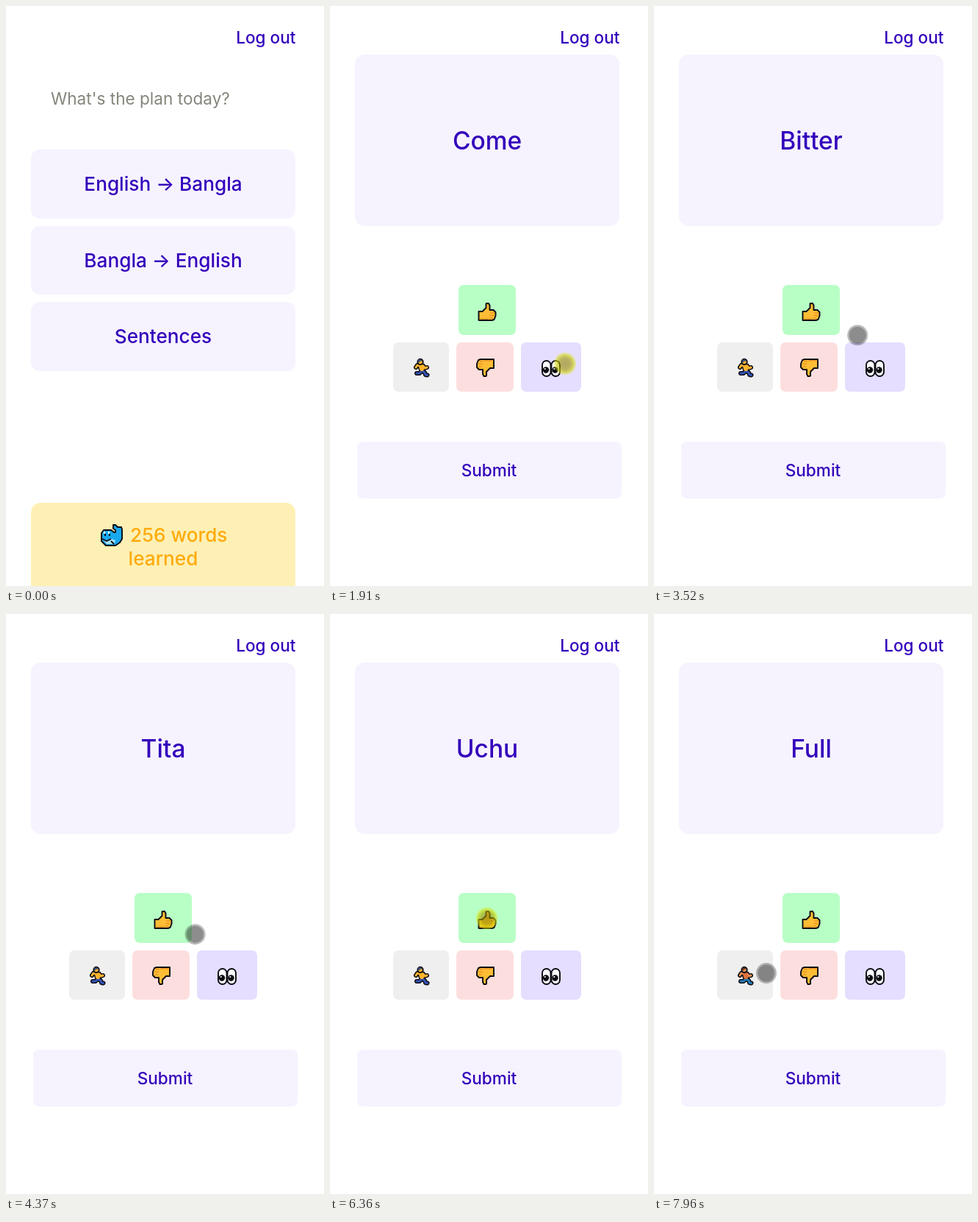
An HTML page that plays this animation: 433x788 px, repeating every 8000 ms.

```html
<!DOCTYPE html>
<html lang="en">
<head>
<meta charset="utf-8">
<title>Word practice</title>
<style>
  html, body { margin: 0; width: 100%; height: 100%; overflow: hidden; background: #fff; }
  svg { display: block; width: 433px; height: 788px; }
  text { font-family: Inter, sans-serif; font-size: 22.6px; font-weight: 450; fill: #30b; }
  .mid { text-anchor: middle; }
  .big { font-size: 26.2px; }
  .gold { fill: #ffab0a; font-weight: 500; }
  .panel { fill: #f6f3ff; }
  .ink { stroke: #0b0b12; stroke-width: 1.9; stroke-linejoin: round; }
  .limb { fill: none; stroke-linecap: round; stroke-linejoin: round; }
</style>
</head>
<body>
<svg viewBox="0 0 433 788">
  <defs>
    <radialGradient id="glow">
      <stop offset="0" stop-color="#8f8300" stop-opacity=".62"/>
      <stop offset=".5" stop-color="#a09600" stop-opacity=".62"/>
      <stop offset=".75" stop-color="#c8cc00" stop-opacity=".64"/>
      <stop offset="1" stop-color="#e4ee20" stop-opacity=".35"/>
    </radialGradient>
    <g id="thumb">
      <path class="ink" fill="#fdbd35" d="M1 12H6L11 7V1.500L12.500 1H14.500L16 4V10H21L24 13V18L22 23L19 24H1Z"/>
      <path d="M17 14H22M16 17.500H22M15 21H20M3 22H14" fill="none" stroke="#e5861c" stroke-width="1.200"/>
    </g>
    <g id="eye">
      <rect class="ink" x="1" y="1" width="11.500" height="21" rx="5.700" fill="#fff"/>
      <circle cx="6" cy="13.500" r="4.200" fill="#0b0b12"/>
      <circle cx="4.800" cy="12" r="1.100" fill="#fff"/>
    </g>
  </defs>

  <text x="394.500" y="51" text-anchor="end">Log out</text>

  <g id="home">
    <text x="61" y="134" style="fill:#85857c;font-weight:400">What's the plan today?</text>
    <rect class="panel" x="34" y="195" width="360" height="94" rx="12"/>
    <rect class="panel" x="34" y="299" width="360" height="93" rx="12"/>
    <rect class="panel" x="34" y="402" width="360" height="94" rx="12"/>
    <g class="mid">
      <text class="big" x="214" y="251">English → Bangla</text>
      <text class="big" x="214" y="355">Bangla → English</text>
      <text class="big" x="214" y="458">Sentences</text>
    </g>
    <rect x="34" y="675" width="360" height="130" rx="13" fill="#fef0b5"/>
    <g transform="translate(129 704)">
      <path class="ink" fill="#18a8ee" d="M1 12L4 8H14L18 11H20V8L17 6V1H20L23 4H28L29 7V20L26 25L20 29H7L1 23Z"/>
      <path d="M3 21L8 23L15 20L20 22L18 27H8Z" fill="#a8e2fa"/>
      <path d="M2 20L8 23L14 20M14 23L18 27" class="ink" fill="none"/>
      <path d="M5 10V13M11 10V13" stroke="#fff" stroke-width="2.200"/>
      <path d="M6 13V16M12 13V16" stroke="#0b0b12" stroke-width="2"/>
    </g>
    <text class="big gold" x="169" y="728">256 words</text>
    <text class="big gold mid" x="214" y="760">learned</text>
  </g>

  <g id="quiz">
    <rect class="panel" x="34" y="66" width="360" height="233" rx="13"/>
    <text id="word" class="mid" x="214" y="195" style="font-size:33.5px"></text>
    <rect x="175" y="379" width="78" height="68" rx="7" fill="#b8ffc6"/>
    <rect x="86" y="457" width="76" height="67" rx="7" fill="#efefef"/>
    <rect x="172" y="457" width="78" height="67" rx="7" fill="#fddede"/>
    <rect x="260" y="457" width="82" height="67" rx="7" fill="#e5deff"/>
    <use href="#thumb" x="201.500" y="403"/>
    <use href="#thumb" transform="translate(224 504) rotate(180)"/>
    <use href="#eye" x="288" y="481"/>
    <use href="#eye" x="300.500" y="481"/>
    <g id="runner" transform="translate(113 479)"></g>
    <rect class="panel" x="37" y="592" width="360" height="77" rx="7"/>
    <text class="mid" x="216.500" y="639">Submit</text>
  </g>

  <g id="cursor">
    <g id="idle">
      <circle r="14" fill-opacity=".27"/>
      <circle r="11.500" fill-opacity=".24"/>
    </g>
    <circle id="press" r="15" fill="url(#glow)"/>
  </g>
</svg>
<script>
const LOOP = 8000;
const el = id => document.getElementById(id);
const show = (id, on) => el(id).setAttribute('visibility', on ? 'visible' : 'hidden');

// Start, end, target x and y, optional curve control point
const moves = [
  [320, 320, 396, 295],
  [320, 640, 358, 229],
  [840, 840, 347, 226],
  [930, 1470, 320, 486, 415, 340],
  [2190, 2640, 231, 418],
  [3180, 3180, 230, 417],
  [3270, 3710, 308, 467],
  [4290, 4510, 224, 414],
  [4850, 5160, 320, 498],
  [5750, 6090, 213.5, 413.5],
  [6700, 7500, 151, 488],
  [7830, 7960, 153, 488]
];
const presses = [[650, 840], [1910, 2040], [3180, 3320], [3970, 4040],
  [4760, 4830], [5340, 5480], [6360, 6490], [7630, 7830]];
const words = [[840, 'Come'], [1980, 'Asi'], [3320, 'Bitter'], [4040, 'Tita'],
  [4830, 'High'], [5410, 'Uchu'], [6490, 'Full']];

const easeOut = u => 1 - (1 - u) * (1 - u);
const smooth = u => u * u * (3 - 2 * u);

function cursorAt(t) {
  let x = 0, y = 0;
  for (const [t0, t1, tx, ty, cx = (x + tx) / 2, cy = (y + ty) / 2] of moves) {
    if (t < t0) break;
    const raw = t >= t1 ? 1 : (t - t0) / (t1 - t0);
    const u = t1 - t0 > 400 ? smooth(raw) : easeOut(raw);
    const v = 1 - u;
    x = v * v * x + 2 * u * v * cx + u * u * tx;
    y = v * v * y + 2 * u * v * cy + u * u * ty;
  }
  return [x, y];
}

// Outlined limbs: a dark stroke under a coloured one
function runner(hair, skin, shirt, legs) {
  const parts = [
    ['M10 10L6 9L4 12', skin], ['M14 10L16 13L19 12', skin],
    ['M12 17L9 20L5 20', legs], ['M13 17L16 19L17 22L19.5 22.5', legs],
    ['M11 10L12 14', shirt, 6]
  ];
  const line = (d, color, w) => `<path class="limb" d="${d}" stroke="${color}" stroke-width="${w}"/>`;
  return parts.map(([d, , w = 3]) => line(d, '#0b0b12', w + 3)).join('') +
    parts.map(([d, c, w = 3]) => line(d, c, w)).join('') +
    `<circle class="ink" cx="10" cy="4.500" r="3.700" fill="${skin}"/>
     <path d="M6.500 4Q7 .5 10.500 1L13 3L9 4L8 6Z" fill="${hair}"/>`;
}
const looks = [
  runner('#394a78', '#fdb52e', '#fdb52e', '#3455b5'),
  runner('#5a3021', '#e88c55', '#e07038', '#277fb8')
];

let look = -1;
function draw(t) {
  const quiz = t >= 840;
  show('home', !quiz);
  show('quiz', quiz);
  const word = words.filter(([at]) => t >= at).pop();
  el('word').textContent = word ? word[1] : '';

  const next = t >= 7830 ? 1 : 0;
  if (next !== look) el('runner').innerHTML = looks[look = next];

  const pressed = presses.some(([a, b]) => t >= a && t < b);
  show('idle', t >= 320 && !pressed);
  show('press', pressed);
  const [x, y] = cursorAt(t);
  el('cursor').setAttribute('transform', `translate(${x.toFixed(2)} ${y.toFixed(2)})`);
}

function tick() {
  draw(performance.now() % LOOP);
  requestAnimationFrame(tick);
}
tick();
</script>
</body>
</html>
```
